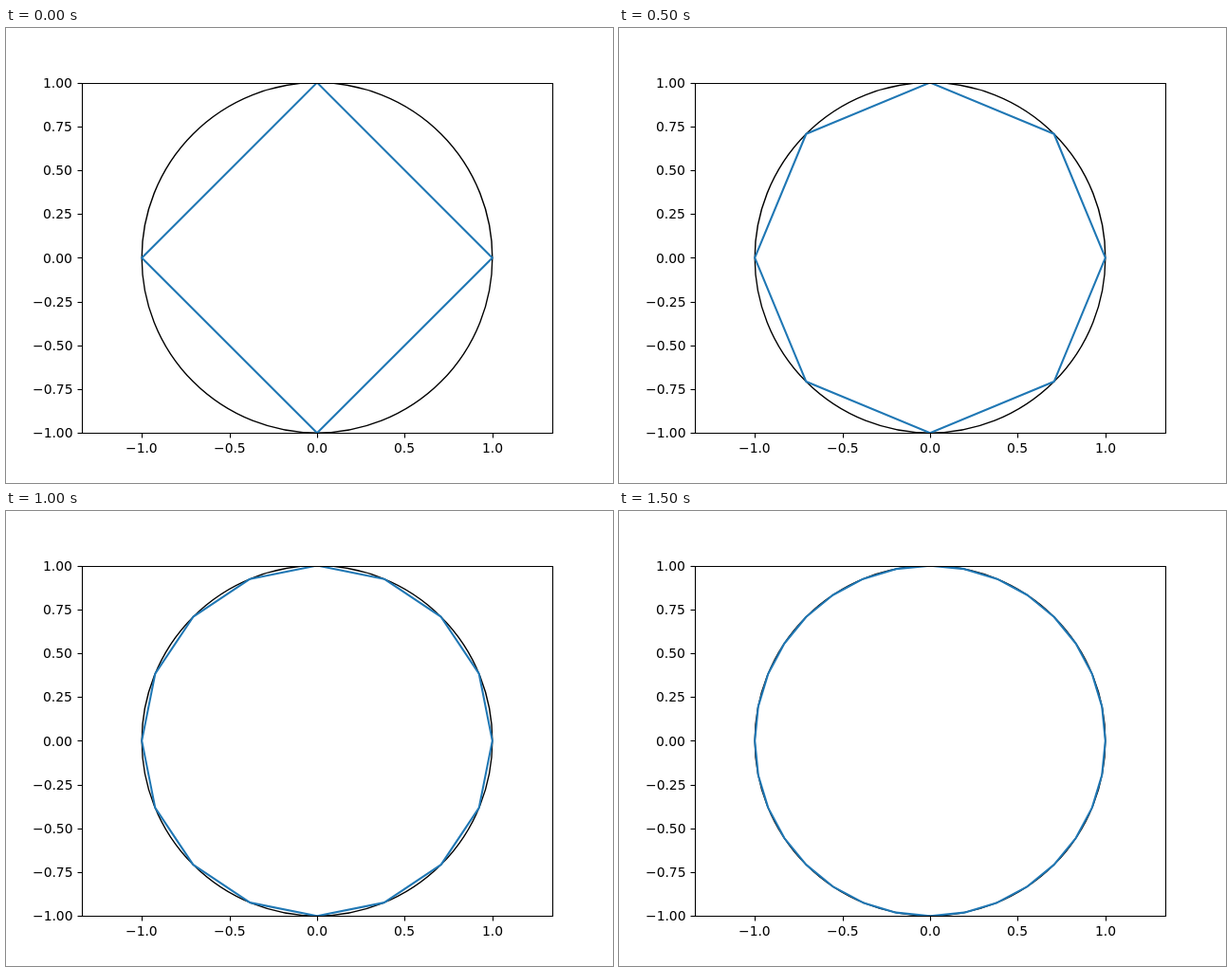
Animation, 640 px wide and 480 px high, one loop 2 s. Source, as an HTML page with a canvas:

```html
<!DOCTYPE html>
<html lang="en">
<head>
<meta charset="utf-8">
<title>Polygons approaching a circle</title>
<style>
  html, body { margin: 0; width: 100%; height: 100%; overflow: hidden; background: #fff; }
  canvas { display: block; }
</style>
</head>
<body>
<canvas id="plot" width="640" height="480"></canvas>
<script>
const ctx = document.getElementById("plot").getContext("2d");

const POINT = 100 / 72; // pixels per typographic point at 100 dpi
const AXES = { left: 80, right: 576, top: 57.6, bottom: 427.2 };
const CENTER = { x: 328, y: 242.4 };
const RADIUS = 184.8;
const STEP_MS = 500;
const STEPS = 4;
const TICK = 5;
const LABEL_GAP = 7 * POINT;

const toX = value => CENTER.x + value * RADIUS;
const toY = value => CENTER.y - value * RADIUS;
const snap = v => Math.floor(v + 0.5) + 0.5;
const format = (value, digits) => value.toFixed(digits).replace("-", "\u2212");

function stroke(color, points, trace) {
  ctx.strokeStyle = color;
  ctx.lineWidth = points * POINT;
  ctx.beginPath();
  trace();
  ctx.stroke();
}

function line(x1, y1, x2, y2) {
  ctx.moveTo(x1, y1);
  ctx.lineTo(x2, y2);
}

function drawTicks() {
  const left = snap(AXES.left), bottom = snap(AXES.bottom);
  ctx.fillStyle = "#000";
  ctx.font = `${10 * POINT}px "DejaVu Sans", sans-serif`;

  for (let i = -2; i <= 2; i++) {
    const x = toX(i / 2), label = format(i / 2, 1);
    stroke("#000", 0.8, () => line(snap(x), bottom, snap(x), bottom + TICK));
    ctx.fillText(label, Math.round(x - ctx.measureText(label).width / 2), 448);
  }
  for (let i = -4; i <= 4; i++) {
    const y = toY(i / 4), label = format(i / 4, 2);
    stroke("#000", 0.8, () => line(left, snap(y), left - TICK, snap(y)));
    const x = AXES.left - LABEL_GAP - ctx.measureText(label).width;
    ctx.fillText(label, Math.round(x), Math.round(y + 5.28));
  }
}

function drawPolygon(sides) {
  ctx.lineJoin = "round";
  stroke("#1f77b4", 1.5, () => {
    for (let i = 0; i < sides; i++) {
      const angle = 2 * Math.PI * i / sides;
      ctx.lineTo(toX(Math.cos(angle)), toY(Math.sin(angle)));
    }
    ctx.closePath();
  });
  ctx.lineJoin = "miter";
}

function draw(step) {
  ctx.fillStyle = "#fff";
  ctx.fillRect(0, 0, 640, 480);

  ctx.save();
  ctx.beginPath();
  ctx.rect(80, 58, 497, 370);
  ctx.clip();
  stroke("#000", 1, () => ctx.arc(CENTER.x, CENTER.y, RADIUS, 0, 2 * Math.PI));
  drawPolygon(4 * 2 ** step);
  ctx.restore();

  drawTicks();
  const left = snap(AXES.left), top = snap(AXES.top);
  stroke("#000", 0.8, () =>
    ctx.rect(left, top, snap(AXES.right) - left, snap(AXES.bottom) - top));
}

const start = performance.now();
function tick() {
  const elapsed = Math.max(0, performance.now() - start);
  draw(Math.floor(elapsed / STEP_MS) % STEPS);
  requestAnimationFrame(tick);
}
tick();
</script>
</body>
</html>
```
